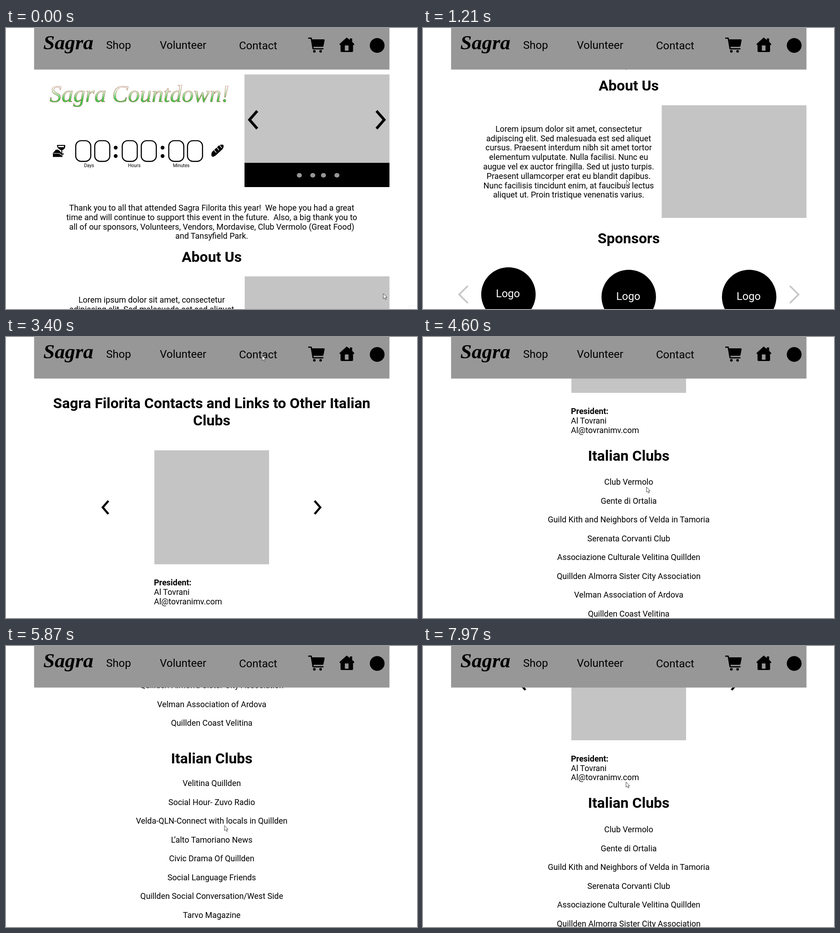
An HTML page that plays this animation: 903 px wide and 620 px high, repeating every 8 s.

```html
<!DOCTYPE html>
<html lang="en">
<head>
<meta charset="utf-8">
<title>Site walkthrough</title>
<style>
html, body { margin: 0; width: 100%; height: 100%; overflow: hidden; background: #fff; }
svg { display: block; position: absolute; left: 0; top: 0; font-family: Roboto, sans-serif; }
text { white-space: pre; }
.body { font-size: 17.9px; }
.head { font-size: 32px; font-weight: 700; }
.nav { font-size: 24px; }
.tag { font-size: 23.6px; fill: #fff; }
.tiny { font-size: 10.2px; }
.mid { text-anchor: middle; }
.brand { font: italic 700 45px "Liberation Serif", serif; }
.fancy { font: italic 52px "Liberation Serif", serif; fill: url(#leaf); stroke: #a8644f; stroke-width: .7; }
</style>
</head>
<body>
<svg id="stage" width="903" height="620" viewBox="0 0 903 620"></svg>
<script>
const LOOP = 8000, SWITCH = 3240;
const GREY = '#979797', PALE = '#c4c4c4', MID = 452;

const text = (x, y, cls, s) => `<text x="${x}" y="${y}" class="${cls}">${s}</text>`;
const lines = (x, y, cls, list, step = 20.8) =>
  list.map((s, i) => text(x, y + i * step, cls, s)).join('');
const box = (x, y, w, h, fill) => `<rect x="${x}" y="${y}" width="${w}" height="${h}" fill="${fill}"/>`;
const dot = (x, y, r, fill = '#000') => `<circle cx="${x}" cy="${y}" r="${r}" fill="${fill}"/>`;
// Angle bracket with its point at (x, y); dx < 0 points right.
const chevron = (x, y, dx, dy, w, color = '#000') =>
  `<path d="M${x + dx} ${y - dy}L${x} ${y}L${x + dx} ${y + dy}" fill="none" stroke="${color}" stroke-width="${w}"/>`;
const badge = (x, y, label, ly) => dot(x, y, 59.8) + text(x - 27.5, ly, 'tag', label);

const digit = x => `<rect x="${x}" y="248.6" width="33" height="45.6" rx="12" fill="none" stroke="#000" stroke-width="2.4"/>`;

const countdown =
  text(96, 163, 'fancy', 'Sagra Countdown!') +
  [153.2, 195, 255.4, 297.2, 357.6, 398.8].map(digit).join('') +
  [241, 344].map(x => dot(x, 264, 4.2) + dot(x, 282.5, 4.2)).join('') +
  text(182.5, 307, 'tiny mid', 'Days') + text(282, 307, 'tiny mid', 'Hours') +
  text(385, 307, 'tiny mid', 'Minutes') +
  // wine and cheese
  `<path d="M112 258H130C131 265 128 268 123.500 269.500V277H127V279H119L121.500 277V269.500C116 268 112 264 112 258Z"/>
   <path d="M114.500 260H127.500L127 263H115.300Z" fill="#fff"/>
   <path d="M103 276L109 269Q114 267 118 271L124 279V284.500H103Z"/>
   <path d="M104 276.500H117L123 281" fill="none" stroke="#fff" stroke-width="1.200"/>` +
  // loaf
  `<path d="M453 273L468 259Q474 256 477.500 258Q479.500 263 475 268L461 281Q455 286 452 283Q450 278 453 273Z"/>
   <path d="M457 269L462 275M463 263.500L468 269.500M469 258.500L474 264.500" stroke="#fff" stroke-width="1.300"/>`;

const carousel =
  box(524, 102.5, 318.5, 195.5, PALE) + box(524, 297.5, 318.5, 53.5, '#000') +
  [644.5, 674, 697.5, 727].map(x => `<ellipse cx="${x}" cy="325" rx="5.5" ry="5" fill="${GREY}"/>`).join('') +
  chevron(535, 202.5, 17, 19.5, 5.8) + chevron(831, 202.5, -17, 19.5, 5.8);

const home = countdown + carousel +
  lines(MID, 403, 'body mid', [
    'Thank you to all that attended Sagra Filorita this year!  We hope you had a great',
    'time and will continue to support this event in the future.  Also, a big thank you to',
    'all of our sponsors, Volunteers, Vendors, Mordavise, Club Vermolo (Great Food)',
    'and Tansyfield Park.']) +
  text(MID, 515.5, 'head mid', 'About Us') +
  box(524.5, 548, 318, 248.5, PALE) +
  lines(320, 606.2, 'body mid', [
    'Lorem ipsum dolor sit amet, consectetur',
    'adipiscing elit. Sed malesuada est sed aliquet',
    'cursus. Praesent interdum nibh sit amet tortor',
    'elementum vulputate. Nulla facilisi. Nunc eu',
    'augue vel ex auctor fringilla. Sed ut justo turpis.',
    'Praesent ullamcorper erat eu blandit dapibus.',
    'Nunc facilisis tincidunt enim, at faucibus lectus',
    'aliquet ut. Proin tristique venenatis varius.']) +
  text(MID, 852.5, 'head mid', 'Sponsors') +
  badge(187.7, 965.3, 'Logo', 971.8) + badge(452, 970.8, 'Logo', 977.4) + badge(716.6, 970.8, 'Logo', 977.4) +
  chevron(79.5, 965.5, 19, 19, 3.8, '#c8c8c8') + chevron(825, 965.5, -19, 19, 3.8, '#c8c8c8') +
  text(MID, 1107.5, 'head mid', 'Upcoming Events') +
  badge(187.7, 1220.2, 'Date', 1228) + badge(187.7, 1392, 'Date', 1400) +
  lines(585.5, 1224, 'body mid', ['Lorem ipsum dolor sit amet, consectetur', 'adipiscing elit.']);

const contact =
  lines(MID, 157.2, 'head mid', ['Sagra Filorita Contacts and Links to Other Italian', 'Clubs'], 37.3) +
  box(326, 250, 252, 251.5, PALE) +
  chevron(212.5, 376, 12.5, 14.5, 4.6) + chevron(690.5, 376, -12.5, 14.5, 4.6) +
  `<text x="325" y="548" class="body" font-weight="700">President:</text>` +
  lines(325, 569, 'body', ['Al Tovrani', 'Al@tovranimv.com']) +
  text(MID, 650.8, 'head mid', 'Italian Clubs') +
  lines(MID, 704.5, 'body mid', [
    'Club Vermolo', 'Gente di Ortalia', 'Guild Kith and Neighbors of Velda in Tamoria',
    'Serenata Corvanti Club', 'Associazione Culturale Velitina Quillden',
    'Quillden Almorra Sister City Association', 'Velman Association of Ardova',
    'Quillden Coast Velitina'], 41.5) +
  text(MID, 1078, 'head mid', 'Italian Clubs') +
  lines(MID, 1127.8, 'body mid', [
    'Velitina Quillden', 'Social Hour- Zuvo Radio', 'Velda-QLN-Connect with locals in Quillden',
    'L’alto Tamoriano News', 'Civic Drama Of Quillden', 'Social Language Friends',
    'Quillden Social Conversation/West Side', 'Tarvo Magazine'], 41.5) +
  box(61.7, 1576, 780.8, 92, GREY);

const header = box(61.7, 0, 780.8, 91.7, GREY) +
  text(82, 47, 'brand', 'Sagra') +
  text(220, 45.5, 'nav', 'Shop') + text(338, 45.5, 'nav', 'Volunteer') + text(512, 46.5, 'nav', 'Contact') +
  // cart
  `<path d="M665 21H670.500Q671.500 21 671.800 22.200L672.500 25.100H698Q700.500 25.300 699.900 27.800L697.500 40Q697 41.600 695.500 41.600H675.500L676 44.400H696.500Q697.800 44.600 697.800 45.800Q697.800 47.100 696.500 47.200H675Q673.600 47.200 673.300 45.900L669.500 23.800H665Q663.700 23.500 663.700 22.400Q663.700 21.200 665 21Z"/>` +
  dot(677.5, 51.4, 2.8) + dot(691.2, 51.4, 2.8) +
  // house
  `<path d="M748.500 21L755.500 26.500V23H760.500V30.500L765 35V37.500H762.500V50.500Q762.500 53 760 53H737.500Q735 53 735 50.500V37.500H733V35Z"/>` +
  box(744.5, 38.5, 8, 11.5, GREY) +
  dot(815.5, 38.5, 16.2);

document.getElementById('stage').innerHTML =
  `<defs><linearGradient id="leaf" x1="0" y1="0" x2="0" y2="1">
    <stop offset=".2" stop-color="#fff"/><stop offset=".42" stop-color="#d3f2cf"/><stop offset=".72" stop-color="#3fc84a"/>
  </linearGradient></defs>
  <g id="home">${home}</g><g id="contact">${contact}</g>${header}
  <rect id="corner" x="885.5" y="612.5" width="30" height="20" rx="2" fill="none" stroke="#efefef"/>
  <path id="cursor" d="M0 0V11.500L2.700 9.200L4.700 13.300L6.500 12.500L4.700 8.500H8Z" fill="#fff" stroke="#333" stroke-width=".9"/>`;

// [time, scroll offset]
const scroll = [
  [440, 0], [580, 126], [700, 126], [760, 252], [900, 252], [1210, 377.5], [1350, 377.5], [1630, 755],
  [SWITCH - .01, 755], [SWITCH, 0], [4030, 0], [4600, 377.5], [4760, 503], [4850, 503],
  [5650, 755], [5870, 818], [6280, 1048], [6700, 1048], [7460, 545], [7540, 545], [7970, 293.5]];

// [time, x, y]
const pointer = [
  [0, 829, 586], [29, 829, 586], [200, 446, 341], [730, 446, 341], [1210, 447, 336], [1370, 447, 336],
  [1630, 456, 326], [1700, 456, 326], [2190, 747, 50], [2320, 747, 50], [2750, 482, 40], [2970, 563, 40],
  [3400, 563, 40], [3900, 491, 331], [4600, 491, 331], [5870, 480, 396], [6720, 480, 396], [7460, 446, 300]];

function at(track, t) {
  const next = track.findIndex(k => k[0] > t);
  if (next < 0) return track[track.length - 1].slice(1);
  if (next === 0) return track[0].slice(1);
  const a = track[next - 1], b = track[next], p = (t - a[0]) / (b[0] - a[0]);
  return a.slice(1).map((v, i) => v + (b[i + 1] - v) * p);
}

const el = id => document.getElementById(id);
const parts = { home: el('home'), contact: el('contact'), cursor: el('cursor'), corner: el('corner') };
const show = (node, on) => node.setAttribute('visibility', on ? 'visible' : 'hidden');

function draw() {
  const t = performance.now() % LOOP;
  const onHome = t < SWITCH, [y] = at(scroll, t);
  show(parts.home, onHome);
  show(parts.contact, !onHome);
  (onHome ? parts.home : parts.contact).setAttribute('transform', `translate(0 ${-y})`);
  parts.cursor.setAttribute('transform', `translate(${at(pointer, t)})`);
  show(parts.corner, t < 200);
  requestAnimationFrame(draw);
}
draw();
</script>
</body>
</html>
```
